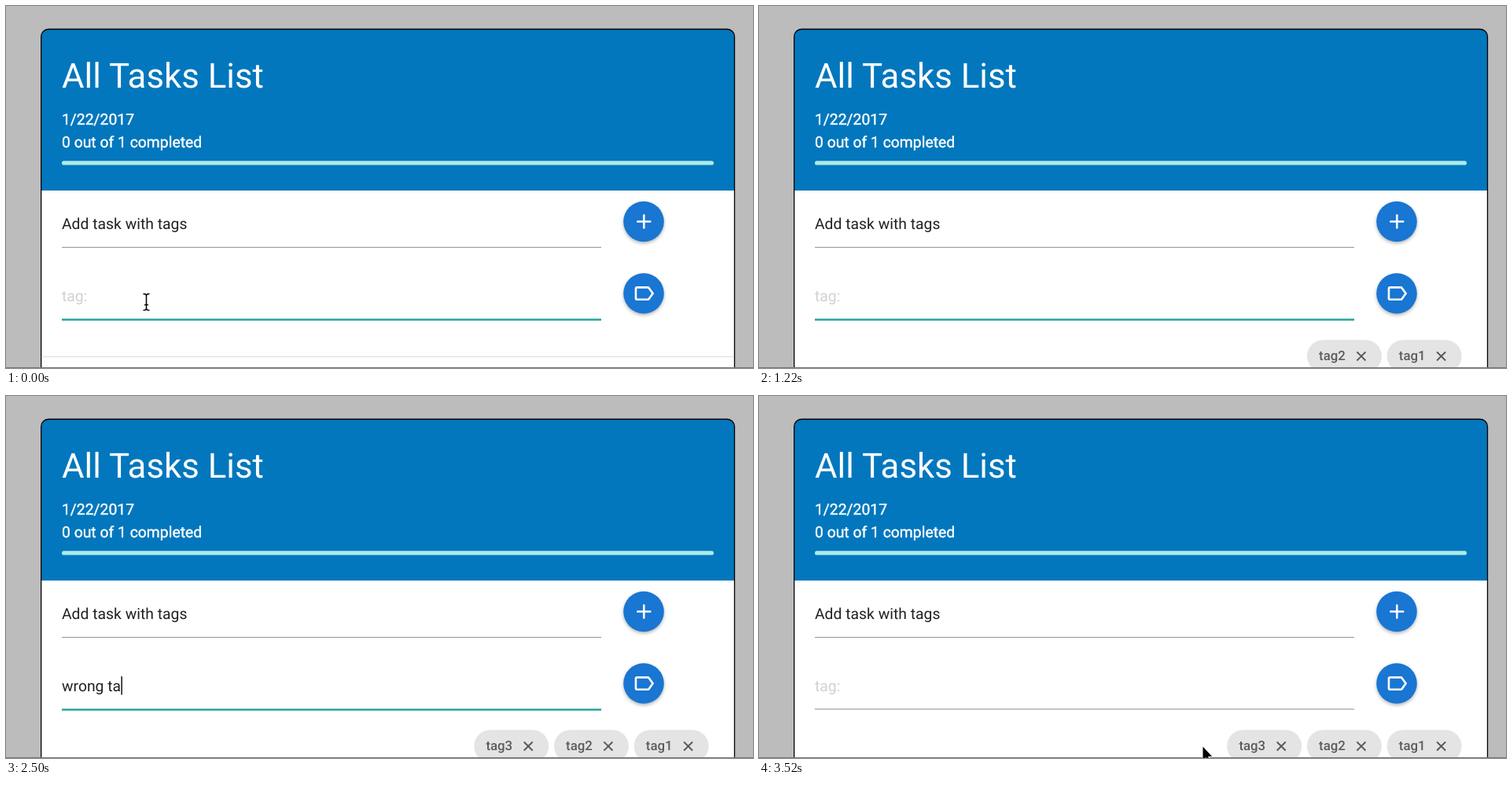
Animation, 950 px wide and 461 px high, one loop 3540 ms. Source, as an HTML page:

```html
<!DOCTYPE html>
<html lang="en">
<head>
<meta charset="utf-8">
<title>All Tasks List</title>
<style>
  html, body { margin: 0; width: 100%; height: 100%; overflow: hidden; background: #bcbcbc; }
  svg { display: block; }
  text { font: 19.35px Roboto, sans-serif; fill: #212121; text-rendering: geometricPrecision; white-space: pre; }
  .head text { fill: #fff; stroke: #fff; stroke-width: .4px; }
  .head .title { font-size: 43.8px; stroke: none; }
  .chip text { font-size: 16.8px; font-weight: 500; fill: #5c5c5c; }
  .button { fill: #1976d2; filter: drop-shadow(0 2px 2px rgba(0, 0, 0, .3)); }
  .cursor path { stroke-linejoin: round; }
</style>
</head>
<body>
<svg width="950" height="461" viewBox="0 0 950 461">
  <path d="M44.7 470V39a9.5 9.5 0 0 1 9.5-9.5H917a9.5 9.5 0 0 1 9.5 9.5V470Z" fill="#fff"/>
  <path d="M44.7 235V39a9.5 9.5 0 0 1 9.5-9.5H917a9.5 9.5 0 0 1 9.5 9.5V235Z" fill="#0277bd"/>
  <path d="M44.7 470V39a9.5 9.5 0 0 1 9.5-9.5H917a9.5 9.5 0 0 1 9.5 9.5V470" fill="none" stroke="#000" stroke-width="1.3"/>
  <g class="head">
    <text class="title" x="71" y="104">All Tasks List</text>
    <text x="71" y="151.2">1/22/2017</text>
    <text x="71" y="179.6">0 out of 1 completed</text>
    <rect x="71" y="197.3" width="829" height="5.2" rx="2.6" fill="#acece6"/>
  </g>

  <text x="71" y="283.7">Add task with tags</text>
  <rect x="71" y="306.8" width="686" height="1.2" fill="#9e9e9e"/>
  <text id="field" x="71" y="375.5"></text>
  <rect id="caret" y="357" width="1.4" height="23.5"/>
  <rect id="underline" x="71" y="398.2" width="686"/>

  <circle class="button" cx="811" cy="274.5" r="25.8"/>
  <path transform="translate(795.8 259) scale(1.29)" fill="#fff" d="M19 13h-6v6h-2v-6H5v-2h6V5h2v6h6z"/>
  <circle class="button" cx="811" cy="366" r="25.8"/>
  <path transform="translate(795.8 350.6) scale(1.29)" fill="#fff" fill-rule="evenodd"
    d="M17.63 5.84C17.27 5.33 16.67 5 16 5H5C3.9 5 3 5.9 3 7v10c0 1.1.9 2 2 2h11c.67 0 1.27-.33 1.63-.84L22 12zM16 17H5V7h11l3.55 5z"/>

  <rect id="divider" x="45.4" y="446" width="880.4" height="1.2" fill="#e0e0e0"/>
  <g id="chips"></g>
  <rect y="460" width="950" height="1" fill="#777"/>

  <g class="cursor" id="beam" fill="none">
    <path d="M-4-10.5Q0-10.5 0-8Q0-10.5 4-10.5M0-8V8M-4 10.5Q0 10.5 0 8Q0 10.5 4 10.5M-2.5 3.5H2.5" stroke="#fff" stroke-width="3"/>
    <path d="M-4-10.5Q0-10.5 0-8Q0-10.5 4-10.5M0-8V8M-4 10.5Q0 10.5 0 8Q0 10.5 4 10.5M-2.5 3.5H2.5" stroke="#000" stroke-width="1.5"/>
  </g>
  <g class="cursor" id="arrow">
    <path d="M0 0V17L3.9 13.4L6.5 19.5L9.1 18.4L6.6 12.4H11.6Z" stroke="#fff" stroke-width="1.6" paint-order="stroke"/>
  </g>
  <g class="cursor" id="hand">
    <path d="M-1.7 1Q0-1 1.7 1L3 6Q5 5 6 6.6Q8 5.8 9 7.4Q11 7 11.5 9.2L11 14L9.5 18H1.5L-4.8 11.6Q-5.2 9 -2.8 9.6L-.4 11.6Z" fill="#fff" stroke="#000" stroke-width="1.3"/>
    <path d="M3 6L3.8 10M6 6.6L6.6 10.2M9 7.4L9.3 10.4" fill="none" stroke="#000"/>
  </g>
</svg>
<script>
const LOOP = 3540, REMOVE = 3280;
const $ = id => document.getElementById(id);
const show = (el, on) => el.setAttribute('visibility', on ? 'visible' : 'hidden');

// Each entry: text, time of each keystroke, time of Enter.
const entries = [
  { text: 'tag1', keys: [140, 220, 300, 400], enter: 580, right: 893.6, width: 95 },
  { text: 'tag2', keys: [740, 800, 880, 960], enter: 1120, right: 791.9, width: 95 },
  { text: 'tag3', keys: [1300, 1360, 1440, 1540], enter: 1700, right: 690.2, width: 95 },
  { text: 'wrong tag', keys: [1920, 2000, 2080, 2160, 2240, 2320, 2400, 2460, 2520], enter: 2640, right: 588.5, width: 136.3 }
];

$('chips').innerHTML = entries.map(({ text, right, width }) => `
  <g class="chip">
    <rect x="${right - width}" y="425.2" width="${width}" height="41.3" rx="20.6" fill="#e4e4e4"/>
    <text x="${right - width + 15.2}" y="451.2">${text}</text>
    <path transform="translate(${right - 26} 446)" d="M-5.5-5.5L5.5 5.5M5.5-5.5L-5.5 5.5" stroke="#555" stroke-width="1.8"/>
  </g>`).join('');
const chips = [...$('chips').children];

// Pointer path: time, x, y.
const path = [[2700, 178.5, 377], [2840, 470.5, 414.5], [3120, 565.5, 444], [3280, 565.5, 444], [3400, 564.5, 446.5]];

function pointerAt(t) {
  if (t < 2700) return path[0].slice(1);
  for (let i = 1; i < path.length; i++) {
    const [t0, x0, y0] = path[i - 1], [t1, x1, y1] = path[i];
    if (t < t1) {
      const k = (t - t0) / (t1 - t0), e = k * (2 - k);
      return [x0 + (x1 - x0) * e, y0 + (y1 - y0) * e];
    }
  }
  return path.at(-1).slice(1);
}

function drawPointer(t) {
  const [x, y] = pointerAt(t);
  const visible = t < 140 || t >= 2720;
  const overClose = x > 551 && y > 434 && t < REMOVE;
  const kind = y < 401 ? 'beam' : overClose ? 'hand' : 'arrow';
  for (const id of ['beam', 'arrow', 'hand']) {
    show($(id), visible && id === kind);
    $(id).setAttribute('transform', `translate(${x} ${y})`);
  }
}

function draw(t) {
  const entry = entries.find(e => t < e.enter);
  const typed = entry ? entry.text.slice(0, entry.keys.filter(k => k <= t).length) : '';
  const field = $('field');
  field.textContent = typed || 'tag:';
  field.style.fill = typed ? '#212121' : '#d1d1d1';
  show($('caret'), typed);
  $('caret').setAttribute('x', 71.3 + field.getComputedTextLength());

  const focused = t < REMOVE;
  $('underline').setAttribute('height', focused ? 2.5 : 1.2);
  $('underline').setAttribute('fill', focused ? '#26a69a' : '#9e9e9e');

  entries.forEach((e, i) => show(chips[i], t >= e.enter && (i < 3 || t < REMOVE)));
  show($('divider'), t < entries[0].enter);
  drawPointer(t);
}

function tick() {
  draw(performance.now() % LOOP);
  requestAnimationFrame(tick);
}
tick();
</script>
</body>
</html>
```
